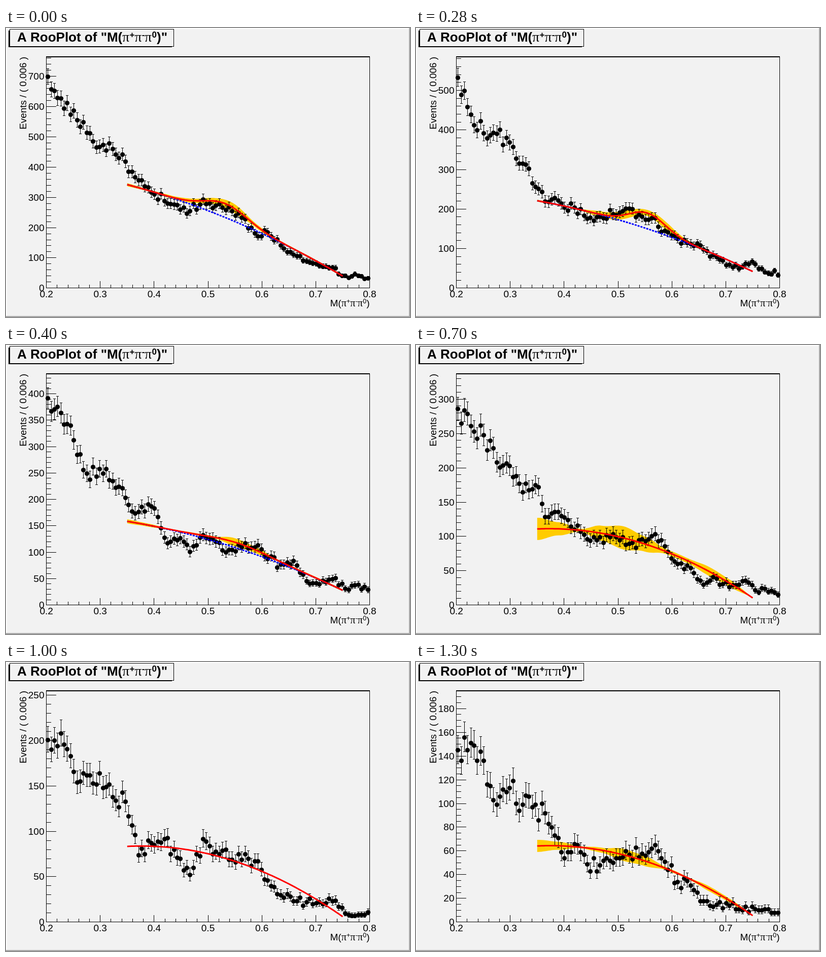
Recreate the animation shown at these times as an HTML page with a canvas. Size 796 by 572 pixels, loop 1600 ms.

```html
<!DOCTYPE html>
<html lang="en">
<head>
<meta charset="utf-8">
<title>RooPlot</title>
<style>
  html, body { margin: 0; width: 796px; height: 572px; overflow: hidden; background: #f2f2f2; }
  canvas { display: block; }
</style>
</head>
<body>
<canvas id="plot" width="796" height="572"></canvas>
<script>
const ctx = document.getElementById('plot').getContext('2d');
const SANS = '"Liberation Sans", Arial, sans-serif';
const SERIF = '"Liberation Serif", Times, serif';
const PAPER = '#f2f2f2';
const LEFT = 79.6, RIGHT = 716.4, TOP = 57.2, BASE = 514.8;
const BINS = 100, STRIDE = 4, FIT_FROM = 0.35, FIT_TO = 0.75;

// counts: every fourth bin; fit: background at start, middle and end;
// peak: height, mean, sigma; band: half widths in pixels along the fit
const scenes = [
  { max: 764.3, major: 100, minor: 20, fit: [342, 220, 40], peak: [46, 0.533, 0.04],
    band: [3, 2, 3, 4, 6, 9, 4, 2, 2, 2, 2],
    counts: [700, 627, 587, 514, 468, 460, 419, 357, 317, 289, 275, 256, 294,
             273, 268, 233, 181, 185, 141, 112, 90, 75, 68, 41, 41, 30] },
  { max: 584.8, major: 100, minor: 20, fit: [221, 152, 42], peak: [40, 0.555, 0.033],
    band: [2, 1, 2, 6, 8, 6, 8, 4, 1, 1, 1],
    counts: [533, 439, 392, 391, 369, 316, 256, 218, 215, 204, 176, 181, 187,
             202, 186, 178, 145, 125, 112, 98, 79, 60, 55, 61, 38, 38] },
  { max: 437.7, major: 50, minor: 10, fit: [158.5, 109, 28], peak: [10, 0.555, 0.055],
    band: [4, 3, 1, 2, 2, 8, 6, 2, 2, 2, 2],
    counts: [392, 364, 313, 249, 258, 235, 204, 177, 187, 128, 123, 101, 133,
             120, 105, 110, 110, 88, 77, 84, 46, 40, 50, 31, 39, 24] },
  { max: 336.9, major: 50, minor: 10, fit: [111, 89, 10.5],
    band: [22, 13, 3, 15, 23, 15, 5, 5, 9, 7, 1],
    counts: [286, 261, 248, 208, 203, 165, 175, 129, 130, 110, 96, 99, 104,
             88, 95, 101, 86, 60, 54, 30, 39, 26, 35, 22, 20, 17] },
  { max: 254.7, major: 50, minor: 10, fit: [83.4, 67, 6],
    counts: [201, 208, 166, 162, 164, 138, 133, 74, 87, 92, 71, 52, 92,
             78, 69, 69, 67, 46, 30, 23, 22, 22, 23, 10, 8, 10] },
  { max: 194.9, major: 20, minor: 5, fit: [64.2, 51.5, 5.5],
    band: [12, 8, 2, 5, 12, 10, 3, 2, 5, 4, 1],
    counts: [145, 151, 136, 99, 113, 99, 99, 83, 59, 66, 49, 48, 50,
             60, 55, 62, 51, 34, 31, 18, 15, 14, 10, 11, 11, 9] }
];

const xAt = m => LEFT + (m - 0.2) / 0.6 * (RIGHT - LEFT);
const yAt = (n, s) => BASE - n / s.max * (BASE - TOP);
const lerp = (list, p) => {
  const i = Math.min(Math.floor(p), list.length - 2);
  return list[i] + (list[i + 1] - list[i]) * (p - i);
};
// Cosine easing between neighbours rounds the band
const smooth = (list, p) => {
  const i = Math.floor(p);
  return lerp(list, i + (1 - Math.cos((p - i) * Math.PI)) / 2);
};

function seeded(seed) {
  return () => (seed = seed * 16807 % 2147483647) / 2147483647;
}

function rect(color, x, y, w, h) {
  ctx.fillStyle = color;
  ctx.fillRect(Math.floor(x), Math.floor(y), w, h);
}

function text(str, x, y, size, align = 'left', weight = '') {
  ctx.font = `${weight} ${size}px ${SANS}`;
  ctx.textAlign = align;
  ctx.fillStyle = '#000';
  ctx.fillText(str, x, y);
  return x + ctx.measureText(str).width;
}

// Writes π⁺π⁻π⁰ and returns the x where it ends
function pions(x, y, size, weight) {
  for (const charge of ['+', '-', '0']) {
    ctx.font = `${size * 1.06}px ${SERIF}`;
    ctx.textAlign = 'left';
    ctx.fillText('π', x, y);
    x = text(charge, x + size * 0.549, y - size * 0.3, size * 0.65, 'left', weight);
  }
  return x;
}

function drawCard() {
  rect('#a9a9a9', 0, 0, 796, 572);
  rect('#fff', 0, 0, 794, 570);
  rect(PAPER, 2, 2, 792, 568);
  rect('#000', 5, 5, 322, 33);
  rect('#000', 7, 2, 324, 35);
  rect(PAPER, 8, 3, 322, 33);
  let x = text('A RooPlot of "M(', 22, 27, 26, 'left', 'bold');
  x = pions(x, 27, 26, 'bold');
  text(')"', x, 27, 26, 'left', 'bold');
}

function drawAxes(s) {
  rect('#000', 79, 56, 638, 2);
  rect('#000', 79, 514, 638, 1);
  rect('#000', 79, 56, 1, 459);
  rect('#000', 716, 56, 1, 459);
  for (let i = 0; i <= 30; i++) {
    const m = 0.2 + i * 0.02, len = i % 5 ? 7 : 14;
    rect('#000', xAt(m), 515 - len, 1, len);
    if (i % 5 === 0) text(m.toFixed(1), xAt(m), 533, 19, 'center');
  }
  for (let n = 0; n <= s.max; n += s.minor) {
    const y = yAt(n, s), big = n % s.major === 0;
    rect('#000', 79, y, big ? 20 : 10, 1);
    if (big) text(n, 75.5, y + 6.5, 19, 'right');
  }
  text(')', 716.5, 551, 19, 'right');
  const x = pions(text('M(', 638.5, 551, 19), 551, 19);
  ctx.save();
  ctx.translate(40, 57);
  ctx.rotate(-Math.PI / 2);
  text('Events / ( 0.006 )', 0, 0, 18.9, 'right');
  ctx.restore();
}

function fitPoints(s, withPeak) {
  const [a, mid, end] = s.fit;
  const b = 4 * mid - 3 * a - end, c = end - a - b;
  const [height, mean, sigma] = withPeak && s.peak || [0, 0, 1];
  return Array.from({ length: 101 }, (_, i) => {
    const u = i / 100, m = FIT_FROM + u * (FIT_TO - FIT_FROM);
    const n = a + b * u + c * u * u + height * Math.exp(-(((m - mean) / sigma) ** 2) / 2);
    return [xAt(m), yAt(n, s), u];
  });
}

function trace(points) {
  ctx.beginPath();
  points.forEach(([x, y]) => ctx.lineTo(x, y));
}

function drawBand(s) {
  if (!s.band) return;
  const edge = sign => fitPoints(s, true).map(([x, y, u]) => [x, y + sign * smooth(s.band, u * 10)]);
  trace([...edge(-1), ...edge(1).reverse()]);
  ctx.fillStyle = '#fc0';
  ctx.fill();
}

function drawCurve(points, color, dash) {
  trace(points);
  ctx.strokeStyle = color;
  ctx.lineWidth = 3;
  ctx.setLineDash(dash);
  ctx.stroke();
}

function drawData(s, seed) {
  const random = seeded(seed);
  for (let i = 0; i < BINS; i++) {
    const trend = lerp(s.counts, i / STRIDE);
    const jitter = i % STRIDE ? (random() * 2 - 1) * Math.sqrt(trend) : 0;
    const n = Math.round(trend + jitter);
    const x = Math.floor(LEFT + (i + 0.5) * (RIGHT - LEFT) / BINS);
    const y = Math.round(yAt(n, s));
    const high = Math.round(yAt(n + Math.sqrt(n + 0.75) + 0.5, s));
    const low = Math.round(yAt(n - Math.sqrt(n + 0.25) + 0.5, s));
    rect('#000', x, high, 1, low - high);
    rect('#000', x - 2, high, 5, 1);
    rect('#000', x - 2, low, 5, 1);
    ctx.beginPath();
    ctx.arc(x + 0.5, y + 0.5, 4.6, 0, 2 * Math.PI);
    ctx.fill();
  }
}

function draw(now) {
  const t = now % 1600;
  const index = t < 100 ? 0 : 1 + Math.floor((t - 100) / 300);
  const s = scenes[index];
  drawCard();
  drawBand(s);
  drawAxes(s);
  drawData(s, 4001 + index * 977);
  if (s.peak) drawCurve(fitPoints(s, false), '#00f', [4, 2]);
  drawCurve(fitPoints(s, true), '#f00', []);
  requestAnimationFrame(draw);
}
draw(0);
</script>
</body>
</html>
```
